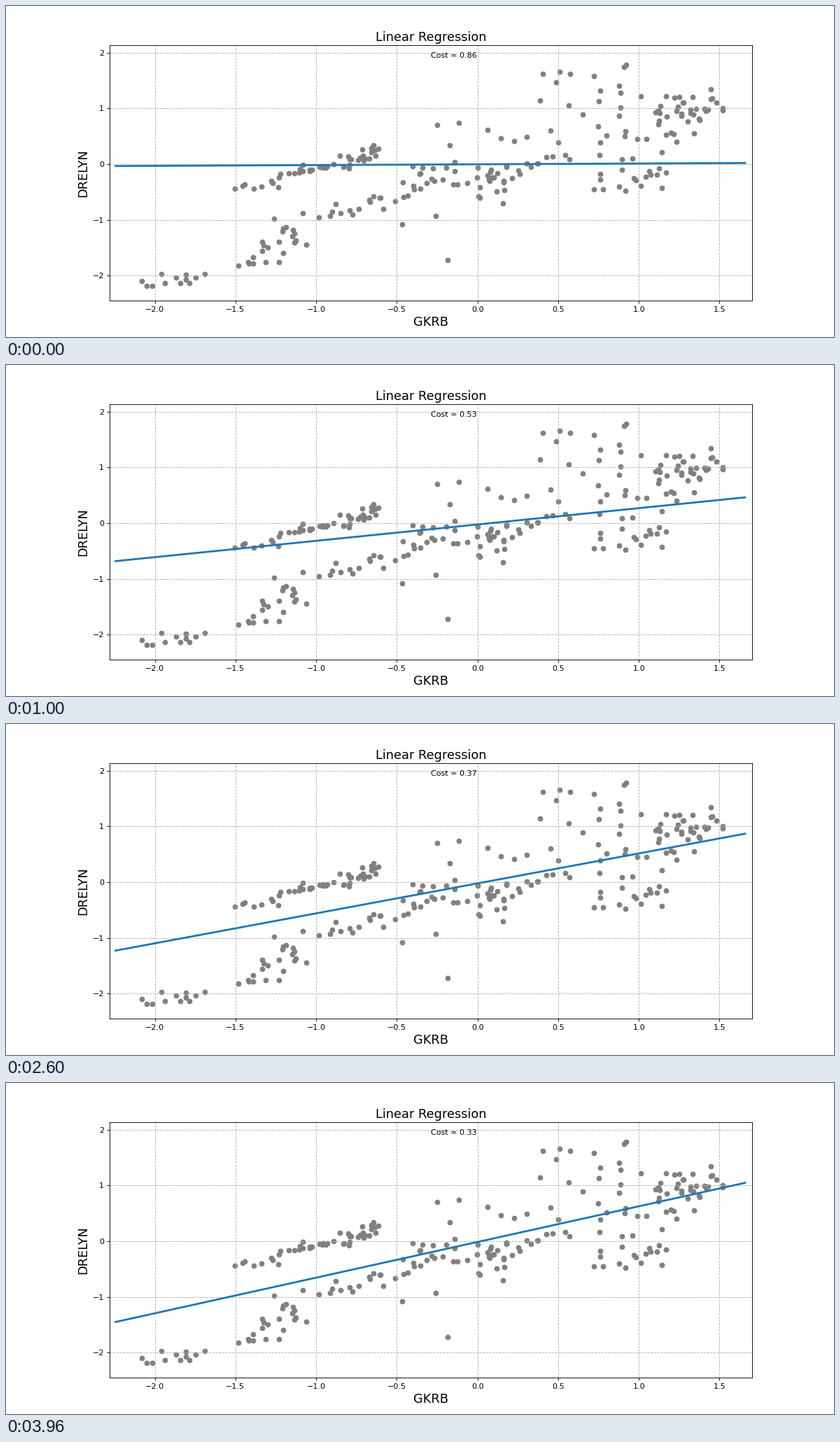
A matplotlib script for the animation above (4 s loop, 1183x473 px).

```python
import numpy as np
import matplotlib.pyplot as plt
from matplotlib.animation import FuncAnimation

W, H, DPI = 1183, 473, 80
FRAMES, INTERVAL = 100, 40

# Bands of the point cloud: count, start, end, vertical spread
BANDS = [
    (12, (-2.08, -2.12), (-1.65, -2.0), 0.09),
    (24, (-1.42, -1.75), (-1.08, -1.05), 0.2),
    (18, (-0.97, -0.95), (-0.4, -0.5), 0.1),
    (12, (-1.5, -0.42), (-1.08, -0.2), 0.07),
    (17, (-1.14, -0.09), (-0.82, 0.0), 0.05),
    (18, (-0.8, 0.08), (-0.62, 0.2), 0.1),
    (3, (-0.48, -1.3), (-0.15, -1.3), 0.25),
    (17, (-0.42, -0.2), (-0.13, -0.1), 0.18),
    (22, (0.0, -0.25), (0.18, -0.3), 0.16),
    (9, (-0.25, 0.4), (0.5, 0.5), 0.2),
    (11, (0.2, -0.15), (0.56, 0.15), 0.08),
    (21, (0.72, -0.25), (1.2, -0.15), 0.2),
    (14, (0.72, 0.6), (1.32, 0.58), 0.12),
    (16, (0.4, 1.35), (1.0, 1.5), 0.27),
    (32, (1.12, 1.02), (1.5, 1.2), 0.2),
]


def make_points():
    rng = np.random.default_rng(7)
    bands = []
    for n, start, end, spread in BANDS:
        band = np.linspace(start, end, n)
        bands.append(band + rng.normal(0, (0.03, spread), band.shape))
    return np.clip(np.vstack(bands), (-2.1, -2.24), (1.52, 1.92))


def fit(step):
    """Slope, intercept and cost after a number of descent steps."""
    decay = 0.9812 ** step
    slope = 0.7537 * (1 - decay)
    intercept = -0.0017 * step * 0.9753 ** step
    return slope, intercept, 0.32 + 0.56 * decay ** 2


fig, ax = plt.subplots(figsize=(W / DPI, H / DPI), dpi=DPI)
fig.subplots_adjust(left=148 / W, right=1065.6 / W,
                    bottom=52.1 / H, top=416.8 / H)
ax.set_xlim(-2.28, 1.7)
ax.set_ylim(-2.449, 2.135)
ax.set_title("Linear Regression", fontsize=16)
ax.set_xlabel("GKRB", fontsize=16)
ax.set_ylabel("DRELYN", fontsize=16)
ax.grid(linestyle="--")
ax.scatter(*make_points().T, color="grey")

ends = np.array([-2.243, 1.658])
line, = ax.plot([], [], color="C0", lw=2.5)
label = ax.text(0.5, 0.95, "", transform=ax.transAxes)


def update(i):
    slope, intercept, cost = fit(i + 1)
    line.set_data(ends, slope * ends + intercept)
    label.set_text(f"Cost = {cost:.2f}")
    return line, label


anim = FuncAnimation(fig, update, frames=FRAMES, interval=INTERVAL,
                     repeat=True, repeat_delay=0)
plt.show()
```
